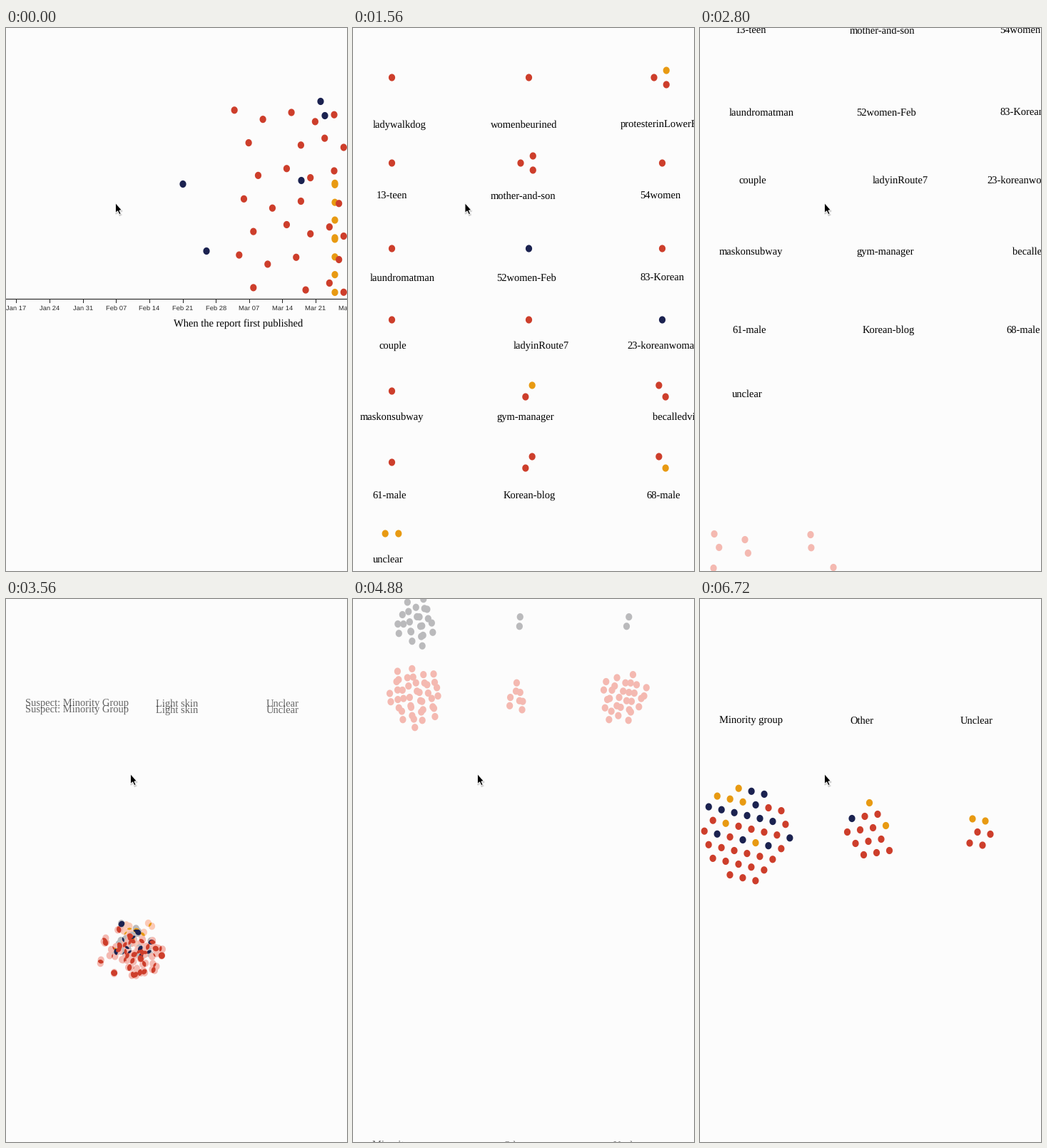
A matplotlib script for the animation above (6.76 s loop, 478 px wide and 762 px high).

```python
import numpy as np
import matplotlib as mpl
import matplotlib.pyplot as plt
from matplotlib.animation import FuncAnimation
from matplotlib.collections import PolyCollection

W, H, DPI = 478, 762, 100
STEP, FRAMES = 40, 169
PAN = 21                   # sideways shift of the page in the later part
BLEND_FROM = 2120          # from here on, motion shows as blended frames
GRID_TOP, SPLIT_TOP, LAST_TOP = 775, 1759.5, 2510
RADII = np.array([4.6, 5.1])
COUNTS = {"Y": 10, "N": 14, "R": 40}
FULL = {"Y": "#e89a12", "N": "#1b2250", "R": "#cd3e2b"}
PALE = {"Y": "#fbcab6", "N": "#bababc", "R": "#f4b9b1"}

mpl.rcParams["text.hinting"] = "none"
rng = np.random.default_rng(8)


def scroll(t):
    """Page scroll: key times in ms, positions in px."""
    return np.interp(
        t,
        [40, 960, 1600, 1920, 2120, 2160, 2700, 2800, 3480, 4160, 4280,
         5480, 5600, 5800, 6440],
        [0, 400, 760, 773, 773, 775, 969, 969, 1595, 1752, 1761,
         2068, 2158, 2158, 2510])


def pan(t):
    return np.interp(t, [1520, 1760], [0, PAN])


def in_out(u):
    return 4 * u**3 if u < 0.5 else 1 - 4 * (1 - u)**3


def glide(u):
    return u + u**2 - u**3


def ease_out(u):
    return 1 - (1 - u)**2


def gather(groups, spare_x, spare_y):
    """Join the points of the colours, filling up with random spare points."""
    out = []
    for key, n in COUNTS.items():
        pts = list(groups.get(key, []))
        while len(pts) < n:
            pts.append((rng.uniform(*spare_x), rng.uniform(*spare_y)))
        out += pts
    return np.array(out, float)


def spread(n):
    """Evenly scattered points in the unit square."""
    return np.outer(np.arange(1, n + 1), (0.7549, 0.5698)) % 1


def sunflower(n, gap=8.5):
    k = np.arange(n)
    r, angle = gap * np.sqrt(k + 0.5), 2.4 * k
    return np.column_stack((r * np.cos(angle), r * np.sin(angle)))


# Dots on the time axis: reports grow denser towards the right
DAY = 6.66
u, v = spread(40).T
days_ago = np.round(30 * u**1.7 - 2.5)
timeline = gather({
    "Y": [(461, 195 + 178 * s) for s in spread(9)[:, 1]],
    "N": [(281, 313), (248, 219), (441, 103), (447, 123), (414, 214)],
    "R": np.column_stack((480 - DAY * days_ago, 92 + 282 * v)),
}, (488, 700), (95, 372))

# One small cluster per story: dot y, label y, then (label x, label, dots)
COLUMNS, TURNS, SPACING = (72, 264, 451), (0, -60, 60), (0, 9.3, 11.5)
STORIES = [
    (32, 97, (45, "ladywalkdog", "R"), (210, "womenbeurined", "R"),
     (392, "protesterinLowerEast", "RRY")),
    (152, 197, (50, "13-teen", "R"), (210, "mother-and-son", "RRR"),
     (420, "54women", "R")),
    (272, 312, (41, "laundromatman", "R"), (219, "52women-Feb", "N"),
     (420, "83-Korean", "R")),
    (372, 407, (54, "couple", "R"), (242, "ladyinRoute7", "R"),
     (402, "23-koreanwoman", "N")),
    (472, 507, (27, "maskonsubway", "R"), (219, "gym-manager", "YR"),
     (438, "becalledvirus", "RR")),
    (572, 617, (45, "61-male", "R"), (228, "Korean-blog", "RR"),
     (429, "68-male", "YR")),
    (672, 707, (45, "unclear", "YY"))]

labels = [(235, 414, "When the report first published")]
cells = {key: [] for key in COUNTS}
for dot_y, label_y, *stories in STORIES:
    for x, turn, (label_x, word, dots) in zip(COLUMNS, TURNS, stories):
        labels.append((label_x - PAN, label_y + GRID_TOP, word))
        r = SPACING[len(dots) - 1]
        for k, key in enumerate(dots):
            angle = np.radians(turn + 360 * k / len(dots))
            cells[key].append((x + r * np.cos(angle), dot_y + r * np.sin(angle)))
grid = gather(cells, (640, 1000), (30, 670)) + (-PAN, GRID_TOP)

for y, words in [(1759, ("Suspect: Minority Group", "Light skin", "Unclear")),
                 (LAST_TOP + 170, ("Minority group", "Other", "Unclear"))]:
    labels += [(x - PAN, y, word) for x, word in zip((27, 210, 365), words)]

# Dots falling out of the grid
fall = gather({
    "R": [(20, 710), (63, 718), (155, 711), (19, 758), (187, 757)],
}, (-10, 340), (785, 990)) + (-PAN, 969)

# One heap that parts sideways by group and upwards by colour
DONE = 0.56
GROUP_X, GROUP_DRIFT = (118, 209, 312), (-45, 28, 100)
parts, drifts = [], []
for y, lift, sizes in [(167, -140, (8, 1, 1)), (242, -90, (12, 1, 1)),
                       (317, -45, (21, 4, 15))]:
    for x, dx, n in zip(GROUP_X, GROUP_DRIFT, sizes):
        parts.append(sunflower(n) + (x, y))
        drifts += [(dx, lift)] * n
split = np.concatenate(parts) + (-PAN, SPLIT_TOP)
drift = np.array(drifts)
heap = split - drift * DONE / (1 - DONE)
apart = split + drift


def pack(colors, centre, squash, origin, a, b):
    """Lattice points nearest to the centre, coloured row by row."""
    steps = np.arange(-9, 10)
    pts = np.array([np.add(origin, np.multiply(i, a) + np.multiply(j, b))
                    for j in steps for i in steps])
    near = np.hypot(*((pts - centre) / (1, squash)).T)
    chosen = np.sort(np.argsort(near)[:len(colors)])
    return zip(colors, pts[chosen])


packed = {key: [] for key in COUNTS}
for cluster in [
        pack("YNNY" "YYNRRN" "NNNNNRR" "YRRRRN" "RNRNYNR" + "R" * 14,
             (65, 328), 1.1, (60, 338), (17.95, 4.1), (-12, 15)),
        pack("Y" "NRR" "RRRY" "RRR" "RRR",
             (237, 328), 1.25, (236, 340), (18, -3), (11.5, 16)),
        pack("YY" "RR" "RR",
             (393, 326.5), 1.1, (389, 327), (18, 3), (-11, 15.5))]:
    for key, point in cluster:
        packed[key].append(point)
final = gather(packed, (0, 1), (0, 1)) + (-PAN, LAST_TOP)

# Target, easing, start and length of each move
MOVES = [
    (grid, in_out, 400, 732), (fall, in_out, 2120, 640),
    (heap, glide, 2760, 1000), (apart, ease_out, 3546, 2120),
    (final, in_out, 5800, 780)]


def dots_at(t):
    pos = timeline
    for target, ease, start, length in MOVES:
        if t > start:
            pos = pos + (target - pos) * ease(min(1, (t - start) / length))
    return pos + (pan(t), -scroll(t))


RIM = np.linspace(0, 2 * np.pi, 32, endpoint=False)
DISC = np.column_stack((np.cos(RIM), np.sin(RIM))) * RADII


def discs(pos):
    return pos[:, None] + DISC


def lenses(a, b):
    """Common area of each dot at two places; a full dot if they agree."""
    d = (b - a) / RADII
    h = np.minimum(np.hypot(*d.T) / 2, 1)[:, None]
    turn = np.arctan2(d[:, 1], d[:, 0])[:, None]
    arc = np.linspace(-1, 1, 18) * np.arccos(h)
    x = np.hstack((np.cos(arc) - h, h - np.cos(arc)))
    y = np.hstack((np.sin(arc), -np.sin(arc)))
    c, s = np.cos(turn), np.sin(turn)
    shape = np.stack((x * c - y * s, x * s + y * c), axis=-1)
    return ((a + b) / 2)[:, None] + shape * RADII


fig = plt.figure(figsize=(W / DPI, H / DPI), dpi=DPI, facecolor="#fcfcfc")
ax = fig.add_axes([0, 0, 1, 1])
ax.set(xlim=(0, W), ylim=(H, 0))
ax.axis("off")


def px(size):
    return size * 72 / DPI


def add_text(words, family, size, **kw):
    return ax.text(0, 0, words, family=family, fontsize=px(size),
                   va="baseline", clip_on=True, **kw)


def add_dots(palette):
    colors = [palette[key] for key, n in COUNTS.items() for _ in range(n)]
    dots = PolyCollection([], facecolors=colors, linewidths=0, zorder=3)
    ax.add_collection(dots, autolim=False)
    return dots


AXIS_Y = 379.5
DATES = ["Jan 17", "Jan 24", "Jan 31", "Feb 07", "Feb 14", "Feb 21",
         "Feb 28", "Mar 07", "Mar 14", "Mar 21", "Mar 28"]
tick_x = 14.5 + 7 * DAY * np.arange(len(DATES))
axis_line, = ax.plot([], [], color="#222222", lw=px(1.1))
ticks = [ax.plot([], [], color="#222222", lw=px(1))[0] for _ in DATES]
dates = [add_text(d, "Liberation Sans", 9.4, ha="center", color="#2a2a2a")
         for d in DATES]
texts = [[add_text(word, "Liberation Serif", 14.5, color="black")
          for _ in range(2)] for *_, word in labels]
layers = [add_dots(palette) for palette in (PALE, PALE, FULL)]

ARROW = np.array([(0, 0), (0, 14), (3.1, 11.3), (5.4, 16.2), (7.6, 15.2),
                  (5.4, 10.5), (9, 10.2)])
shadow, = ax.fill(*ARROW.T, color="black", alpha=0.12, lw=px(2), zorder=4)
cursor, = ax.fill(*ARROW.T, fc="black", ec="white", lw=px(0.9), zorder=5)


def place_text(text, x, y, alpha=1):
    text.set_visible(-15 < y < H + 15)
    text.set_position((x, y))
    text.set_alpha(alpha)


def draw(i):
    t = i * STEP
    before = t - STEP if t >= BLEND_FROM else t
    top, old_top, dx = scroll(t), scroll(before), pan(t)

    y = AXIS_Y - top
    axis_line.set_data([0, W], [y, y])
    for x, tick, date in zip(tick_x, ticks, dates):
        tick.set_data([x + dx] * 2, [y, y + 5])
        place_text(date, x + dx, y + 16)

    blended = abs(top - old_top) > 0.1
    for (x, y, _), (now, ghost) in zip(labels, texts):
        place_text(now, x + dx, y + 5 - top, 0.6 if blended else 1)
        place_text(ghost, x + dx, y + 5 - old_top, 0.6)
        if not blended:
            ghost.set_visible(False)

    a, b = dots_at(before), dots_at(t)
    moving = np.abs(b - a).max() > 0.1
    for layer, verts in zip(layers, (discs(a), discs(b), lenses(a, b))):
        layer.set_verts(verts)
    for layer in layers[:2]:
        layer.set_visible(moving)

    tip = np.array([153.5 + dx, 245.5])
    cursor.set_xy(ARROW + tip)
    shadow.set_xy(ARROW + tip + (0.5, 1.5))


anim = FuncAnimation(fig, draw, frames=FRAMES, interval=STEP,
                     init_func=lambda: draw(0), repeat=True, repeat_delay=0)
plt.show()
```
